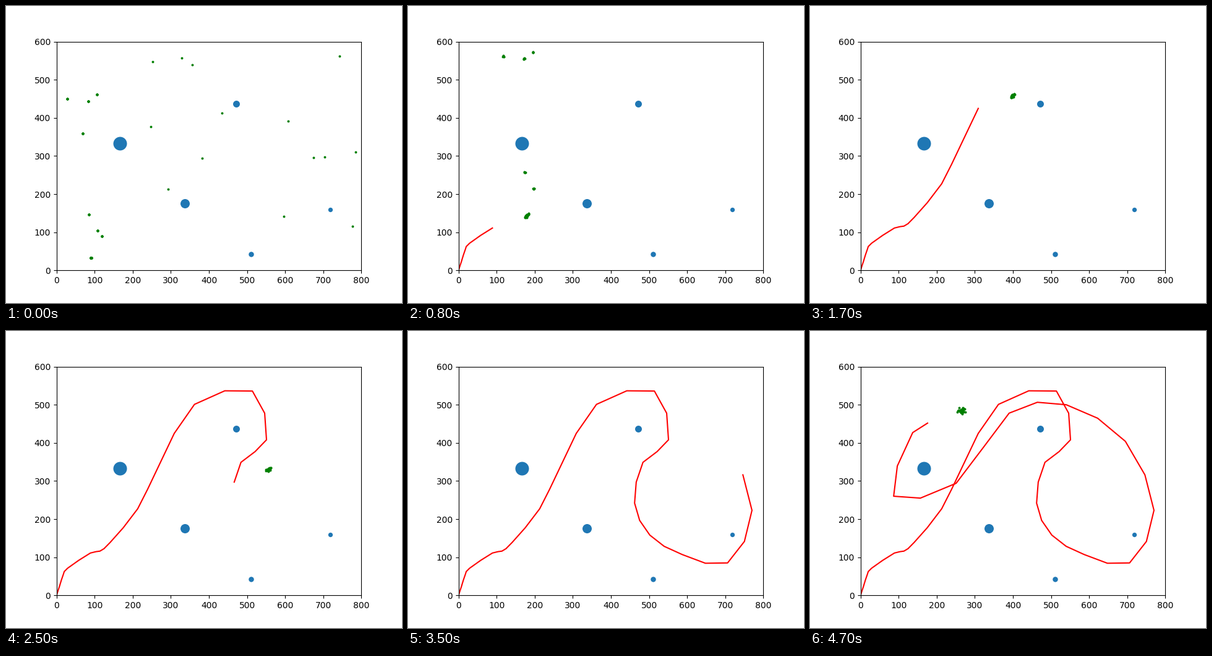
Recreate the animation shown at these times as a matplotlib script. Size 640x480 px, loop 4.8 s.

```python
import numpy as np
import matplotlib.pyplot as plt
from matplotlib.animation import FuncAnimation

FRAMES, STEP_MS = 48, 100
CLOUD = np.array([90.5, 33])  # offset from the tracked point to the cloud

# Turning points of the walk, two time steps apart
keys = np.array([
    (0, 0), (8, 24), (18, 55), (29, 71), (89, 111), (114, 116), (141, 139),
    (213, 227), (268, 339), (362, 501), (514, 536), (551, 408), (484, 349),
    (462, 242), (502, 158), (587, 107), (706, 85), (770, 223), (695, 404),
    (540, 500), (390, 478), (251, 294), (87, 260), (137, 427), (219, 460)])

landmarks = [(167, 333, 22), (336, 175, 15), (472, 437, 11),
             (510, 43, 8.5), (718, 159, 7.3)]  # x, y, diameter in px

# Particles that stay near the cloud's column survive longest
likely = np.array([(28, 450), (84, 443.5), (106.5, 461), (85.5, 146.5),
                   (108, 104)])


def halve_steps(p):
    """Insert a Catmull-Rom midpoint between neighbouring points."""
    q = np.vstack([2 * p[0] - p[1], p, 2 * p[-1] - p[-2]])
    out = np.repeat(p, 2, axis=0)[:-1].astype(float)
    out[1::2] = (9 * (q[1:-2] + q[2:-1]) - q[:-3] - q[3:]) / 16
    return out


def scatter_strays(n=16):
    """Stray particles, denser on the left; the right ones die first."""
    rng = np.random.default_rng(4)
    x = 800 * rng.uniform(0.1, 1, n) ** 1.4
    y = rng.uniform(15, 580, n)
    spots = np.vstack([likely, np.column_stack([x, y])])
    life = np.append(np.full(len(likely), 10), 1 + 5 * (1 - x / 800))
    return spots, life


path = halve_steps(keys)
strays, life = scatter_strays()
# Resampled particles lie on top of each other on the left
copies = np.where(strays[:, 0] < 230, 6, 1)


def cloud(k, rng):
    stretch = np.interp(k, [0, 8, 35, 47], [0, 4.8, 5, 2])
    spread = np.interp(k, [0, 8, 40, 47], [0.3, 1.4, 2.4, 4.2])
    along = rng.uniform(-1, 1, (30, 1)) * stretch * np.array([1, 0.9])
    return CLOUD + along + rng.normal(0, spread, (30, 2))


def particles(k):
    rng = np.random.default_rng(100 + k)
    alive = k <= life
    spots = np.repeat(strays[alive], copies[alive], axis=0)
    spots = spots + rng.normal(0, 0.1 * k, spots.shape)
    return np.vstack([cloud(k, rng), spots]) + path[k]


fig, ax = plt.subplots(figsize=(6.4, 4.8), dpi=100)
ax.set_aspect("equal")
ax.set_xlim(0, 800)
ax.set_ylim(0, 600)

for x, y, size in landmarks:
    ax.plot(x, y, "o", color="#1f77b4", ms=size * 0.72, mew=0, zorder=1)
trail, = ax.plot([], [], color="red", lw=1.5)
dots, = ax.plot([], [], "o", color="green", ms=1.8, mew=1)


def draw(k):
    trail.set_data(*path[:k + 1].T)
    dots.set_data(*particles(k).T)
    return trail, dots


anim = FuncAnimation(fig, draw, frames=FRAMES, interval=STEP_MS,
                     repeat=True, repeat_delay=0)
plt.show()
```
